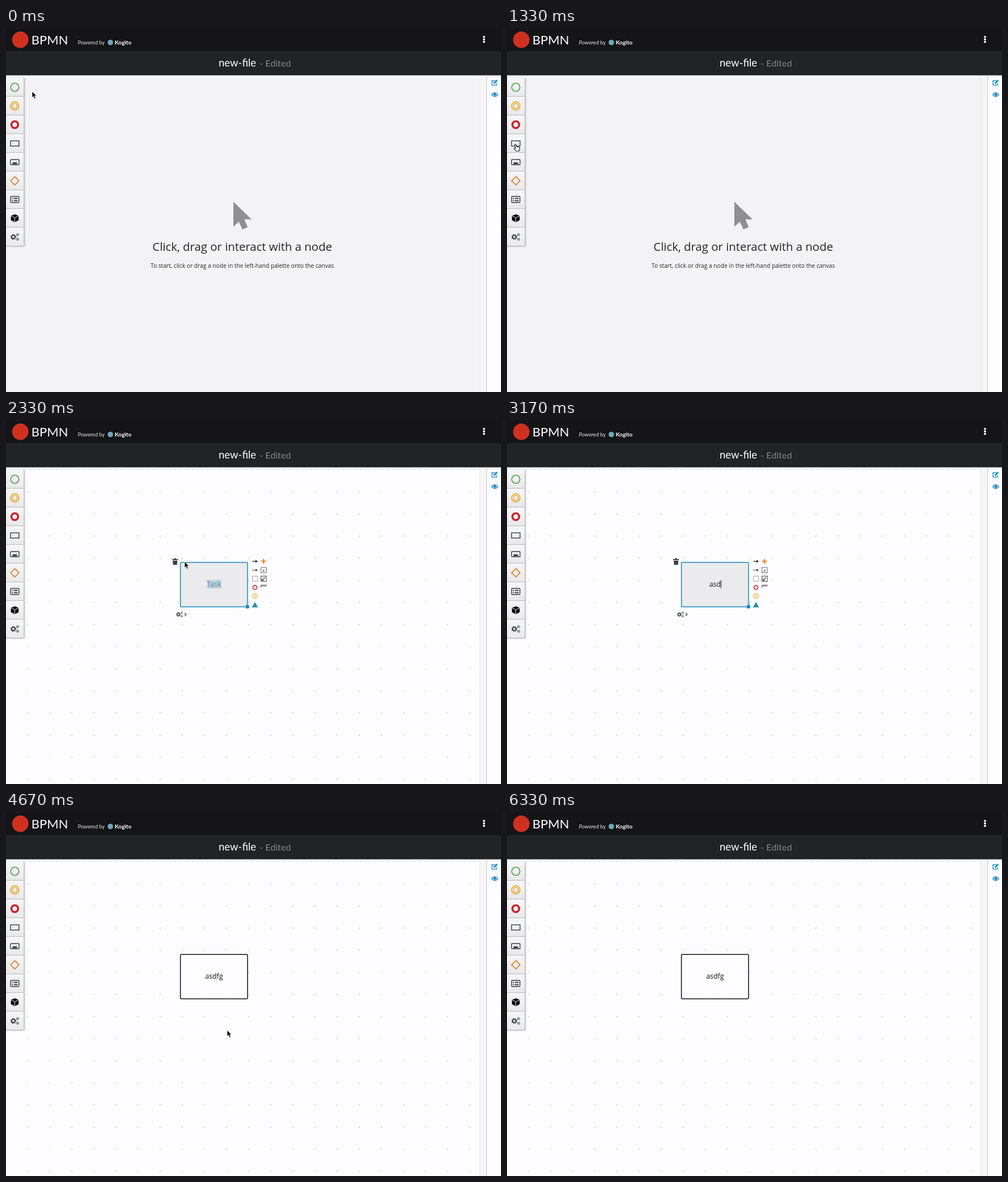
An HTML page that plays this animation: 873x642 px, repeating every 6.84 s.

```html
<!DOCTYPE html>
<html lang="en">
<head>
<meta charset="utf-8">
<title>BPMN editor</title>
<style>
  html, body { margin: 0; width: 100%; height: 100%; overflow: hidden; background: #fdfcfe; }
  svg { display: block; width: 873px; height: 642px; font-family: "Open Sans", sans-serif; }
  .brand { font-family: Lato, sans-serif; }
  .line { fill: none; stroke: #393f44; stroke-width: 1.4; }
  .mid { text-anchor: middle; }
</style>
</head>
<body>
<svg viewBox="0 0 873 642">
  <defs>
    <pattern id="dots" x="18" y="107" width="39" height="39" patternUnits="userSpaceOnUse">
      <rect x="19" y="19" width="1.6" height="1.4" fill="#b4b4b8"/>
    </pattern>
    <linearGradient id="button" x2="0" y2="1">
      <stop stop-color="#f6f6f7"/><stop offset="1" stop-color="#e9e9eb"/>
    </linearGradient>
    <filter id="shadow" x="-50%" width="200%">
      <feDropShadow dx="1" dy="1" stdDeviation="1.5" flood-opacity=".35"/>
    </filter>
    <g id="gear" fill="none" stroke="#393f44">
      <circle r="2.9" stroke-width="1.9"/>
      <circle r="4.4" stroke-width="1.5" stroke-dasharray="1.73"/>
    </g>
    <g id="gears">
      <use href="#gear" x="-2.6"/>
      <use href="#gear" transform="translate(4.9 -4) scale(.52)"/>
      <use href="#gear" transform="translate(4.9 4) scale(.52)"/>
    </g>
  </defs>

  <!-- canvas -->
  <rect width="873" height="642" fill="#fdfcfe"/>
  <g id="welcome">
    <rect y="88" width="836" height="554" fill="#f3f2f4"/>
    <path d="M401 306.5V350.5L410.7 341.5 416.8 355.3 426.3 351.3 420.3 337.5H433Z" fill="#8f8e91"/>
    <g class="mid" fill="#26262a">
      <text x="416.7" y="393.3" font-size="20.36">Click, drag or interact with a node</text>
      <text x="416.7" y="423" font-size="10.22">To start, click or drag a node in the left-hand palette onto the canvas</text>
    </g>
  </g>
  <g id="board">
    <rect x="32" y="107" width="804" height="535" fill="url(#dots)"/>
    <path d="M32 87.5H836" stroke="#dcdbde" stroke-dasharray="4 4"/>
    <rect id="task" x="307.6" y="251.2" width="118.4" height="78.2" rx="1.5" stroke-width="1.5"/>
    <rect id="highlight" x="354.5" y="282" width="25" height="15" fill="#b8d2e3"/>
    <text id="label" class="mid" x="366.9" y="293.7" font-size="12.4"></text>
    <path id="caret" d="M377.5 282.5V297" stroke="#222"/>
    <g id="tools">
      <circle cx="425.8" cy="329.2" r="3.2" fill="#0088ce"/>
      <path d="M293 245.3H303.3V247H293ZM296.3 244H300V246H296.3ZM294 248H302.3L301.6 255.4H294.7Z" fill="#393f44"/>
      <use href="#gears" transform="translate(306 343) scale(.77)"/>
      <path d="M315.8 340.5L318.7 343 315.8 345.5Z" class="line" style="stroke-width:1"/>
      <path d="M434.5 249.3H441" class="line"/>
      <path d="M440 246.6L444 249.3 440 252ZM440 262.4L444 264.7 440 267Z" fill="#303338"/>
      <path d="M434.5 264.7H441" class="line" stroke-dasharray="1.6 1"/>
      <path d="M450 249.2H458.4M454.2 245V253.4" stroke="#ec8a35" stroke-width="2.3"/>
      <g fill="none" stroke="#65686c">
        <rect x="449.7" y="260.2" width="9.4" height="9.2"/>
        <path d="M452.8 265.8H456M454.4 264.2V267.4" stroke-width="1.2"/>
        <rect x="434.5" y="275.4" width="9" height="9" stroke="#a1a2a6"/>
        <rect x="449.7" y="275.4" width="9.4" height="9.2" stroke-width="1.3"/>
        <path d="M452 282.5L457 277.5M451.5 280V283H454.5" stroke-width="1.7"/>
        <path d="M449.8 296V291.3H460M449.8 293H459" stroke-width="1.2"/>
      </g>
      <circle cx="439" cy="295.3" r="3.5" fill="none" stroke="#cc4a4f" stroke-width="1.9"/>
      <g fill="none" stroke="#eaae3c">
        <circle cx="439" cy="310.6" r="4.2" stroke-width="1.2"/>
        <circle cx="439" cy="310.6" r="1.5"/>
      </g>
      <path d="M439 321L444.4 330.4H433.6Z" fill="#2b8ca5"/>
    </g>
  </g>

  <!-- right dock -->
  <rect x="836" y="84" width="11" height="558" fill="#f6f5f7"/>
  <path d="M836 88V642" stroke="#e4e3e6"/>
  <path d="M847.5 84V642" stroke="#c9c9cc"/>
  <g fill="none" stroke="#1487c9" stroke-width="1.3">
    <path d="M863 92.7H857.2V100.7H865.3V97.5"/>
    <path d="M860.5 97.8L866.3 92" stroke-width="2.6"/>
    <path d="M856.6 117.5Q862 110.8 867.4 117.5Q862 124 856.6 117.5Z"/>
    <circle cx="862" cy="117.2" r="1.7" fill="#1487c9"/>
  </g>

  <!-- palette -->
  <rect x="-4" y="88" width="35.5" height="296" fill="#eee" filter="url(#shadow)"/>
  <g id="buttons"></g>
  <path d="M31.5 88V384" stroke="#c3c3c6"/>
  <rect id="pressed" x=".8" y="188.7" width="28.6" height="29" rx="1.5" fill="#dedee2" stroke="#2467b8" stroke-width="1.8"/>
  <g fill="none" transform="translate(15.5 104.5)">
    <circle r="7.2" stroke="#48a044" stroke-width="1.6"/>
    <g stroke="#e3a21a" stroke-width="1.5"><circle cy="33" r="7.4"/><circle cy="33" r="4.4"/></g>
    <circle cy="66" r="6" stroke="#c1272d" stroke-width="3.6"/>
    <rect x="-7.5" y="94.5" width="15" height="9.3" class="line"/>
    <rect x="-7.5" y="127.5" width="15" height="9.3" rx="1" class="line"/>
    <rect x="-4" y="132.4" width="8" height="3.4" fill="#393f44"/>
    <path d="M0 157.6L7.4 165 0 172.4-7.4 165Z" stroke="#e47a20" stroke-width="1.6"/>
    <rect x="-7.3" y="192.5" width="14.6" height="10.8" rx="1" class="line"/>
    <path d="M-5 196H-3M-1.5 196H5M-5 200H-3M-1.5 200H5" class="line" style="stroke-width:1.8"/>
    <path d="M0 224L6.8 226.7V234.6L0 238-6.8 234.6V226.7Z" fill="#050505"/>
    <path d="M-6.5 227.2L0 230 6.5 227.2M0 230V238" stroke="#eee"/>
    <use href="#gears" y="264"/>
  </g>

  <!-- header -->
  <rect width="873" height="41" fill="#151417"/>
  <rect y="40.5" width="873" height="43" fill="#212326"/>
  <circle cx="25.2" cy="20.7" r="14.5" fill="#d0311f"/>
  <circle cx="184" cy="25.5" r="4.8" fill="#6fa9bd"/>
  <g class="brand" fill="#fff">
    <text x="44.8" y="28.7" font-size="22">BPMN</text>
    <text x="126.8" y="29.4" font-size="9.1" fill="#e6e6e8">Powered by</text>
    <text x="191.7" y="29.4" font-size="10" font-weight="700">Kogito</text>
    <text x="375" y="68.3" font-size="18.5">new-file</text>
    <text x="447" y="68.3" font-size="16.2" fill="#85878a">- Edited</text>
    <circle cx="843" cy="15.6" r="1.9"/><circle cx="843" cy="20" r="1.9"/><circle cx="843" cy="24.4" r="1.9"/>
  </g>

  <!-- pointer -->
  <g id="pointer">
    <rect id="ghost" x=".8" y="1.2" width="17.4" height="17.2" fill="#efeef0" stroke="#858588" stroke-width="1.7"/>
    <path id="arrow" d="M0 0V10.8L2.5 8.5 4.3 12.6 6.3 11.7 4.5 7.7H7.9Z" fill="#000" stroke="#fff" stroke-width=".7"/>
    <path id="hand" d="M-1.5 1Q0-1 1 1L2 4.3 4.7 4.5 7 5.8 7.5 9 6.3 12H1L-2.5 8Q-2.7 6 0 7.2Z" fill="#fff" stroke="#111" stroke-width="1.1" stroke-linejoin="round"/>
  </g>
</svg>
<script>
  const LOOP = 6840, STEP = 1000 / 6;
  const $ = id => document.getElementById(id);
  const show = (id, on) => { $(id).style.display = on ? '' : 'none'; };

  for (let i = 0; i < 9; i++) {
    const y = 88 + 33 * i;
    $('buttons').innerHTML += `<rect y="${y}" width="31" height="32" fill="url(#button)"/>
      <path d="M0 ${y + 32.5}H31" stroke="#b9b9bd"/>`;
  }

  // step, x, y of the pointer tip
  const path = [[0, 46, 112], [7, 15, 205], [9, 15, 205], [12, 309, 252], [14, 315, 250],
    [21, 315, 250], [25, 390, 385], [28, 390, 385], [32, 402, 648]];

  function pointerAt(step) {
    const i = path.findIndex(p => p[0] > step);
    if (i < 0) return path.at(-1).slice(1);
    const [s0, x0, y0] = path[i - 1], [s1, x1, y1] = path[i];
    const u = (step - s0) / (s1 - s0), k = u * u * (3 - 2 * u);
    return [x0 + (x1 - x0) * k, y0 + (y1 - y0) * k];
  }

  function draw(time) {
    const step = Math.floor((time % LOOP + 4) / STEP);
    const dropped = step >= 14, dragging = step >= 9 && !dropped;
    const selected = step < 26, typed = Math.min(5, step - 16);
    const [x, y] = pointerAt(step);
    const overPalette = x < 31 && !dragging;

    show('welcome', !dropped);
    show('board', dropped);
    show('tools', selected);
    show('highlight', typed < 1);
    show('pressed', dragging);
    show('ghost', dragging);
    show('hand', overPalette);
    show('arrow', !overPalette);
    show('pointer', (step < 17 || step > 21) && step < 32);
    $('pointer').setAttribute('transform', `translate(${x} ${y})`);

    $('task').setAttribute('fill', selected ? '#e8e8e9d8' : '#fdfcfee0');
    $('task').setAttribute('stroke', selected ? '#1b8abb' : '#111');
    $('label').textContent = typed < 1 ? 'Task' : 'asdfg'.slice(0, typed);
    $('label').setAttribute('fill', typed < 1 ? '#75818b' : '#151515');
    show('caret', typed > 0 && selected);
    const half = $('label').getComputedTextLength() / 2;
    $('caret').setAttribute('transform', `translate(${366.9 + half - 377})`);
  }

  function tick() {
    draw(performance.now());
    requestAnimationFrame(tick);
  }
  tick();
</script>
</body>
</html>
```
